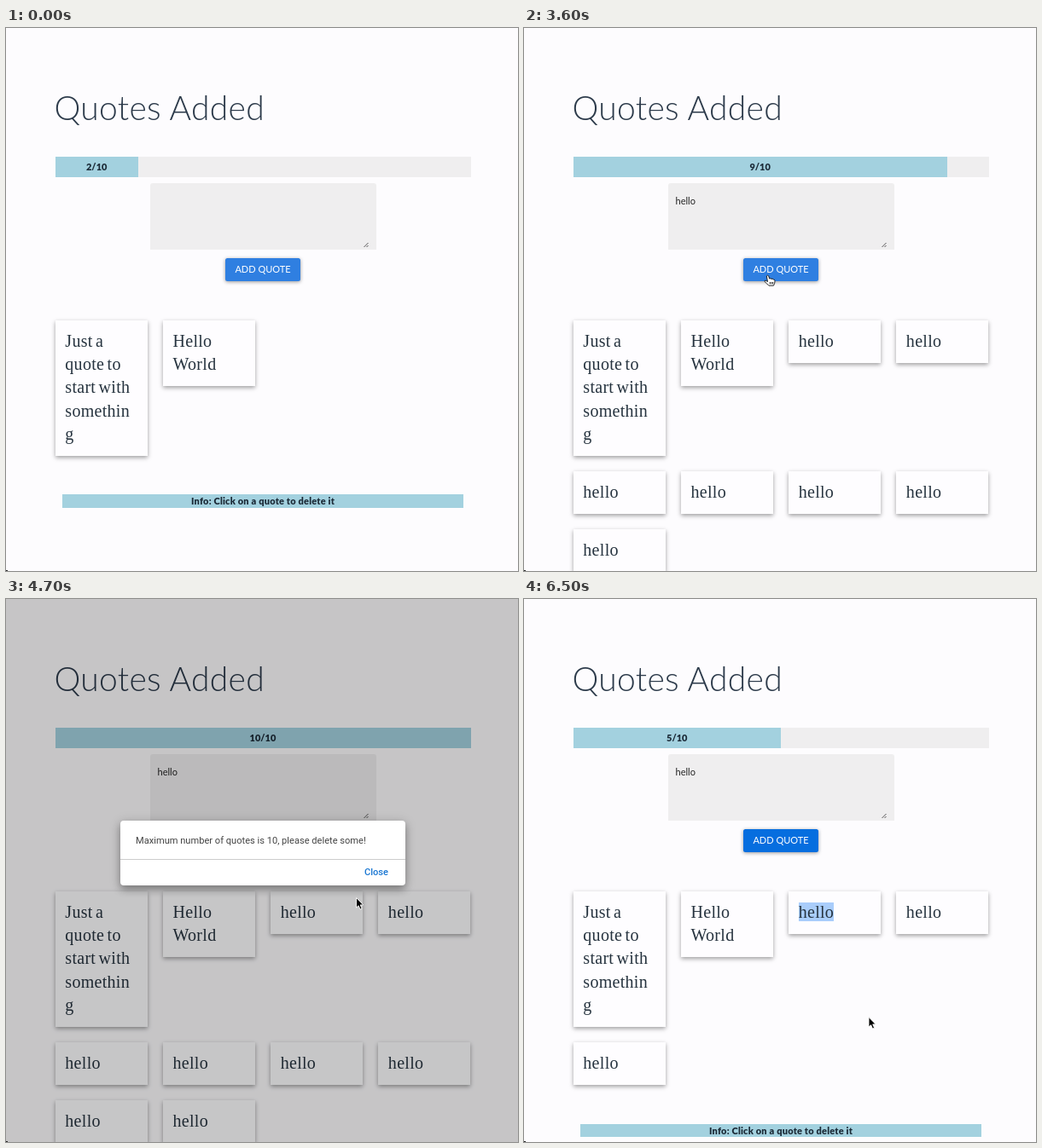
Recreate the animation shown at these times as an HTML page. Size 600 by 637 pixels, loop 6600 ms.

```html
<!DOCTYPE html>
<html lang="en">
<head>
<meta charset="utf-8">
<title>Quotes Added</title>
<style>
  html, body { margin: 0; width: 100%; height: 100%; overflow: hidden; }
  body { background: #fdfcfe; color: #2c3a4a; font: 11px/1.2 Lato, sans-serif; }
  #stage { position: relative; width: 600px; height: 637px; overflow: hidden; }
  #stage div, #stage svg { position: absolute; box-sizing: border-box; }
  h1 {
    position: absolute; left: 56.5px; top: 70px; margin: 0;
    font: 300 39px/46px Lato, sans-serif; letter-spacing: .3px; white-space: nowrap;
  }
  #track { left: 57.5px; top: 151px; width: 487px; height: 23.5px; background: #efeeef; }
  #bar, #info { background: #a3d1df; color: #1c2b38; font-weight: 900; text-align: center; }
  #bar { height: 100%; line-height: 23.5px; }
  #field {
    left: 168.5px; top: 182px; width: 265.5px; height: 77.5px; padding: 14px 9px;
    background: #efeeef; border-radius: 3px 3px 0 0; color: #222; line-height: 14px;
  }
  #field.focus { background: #cecdce; box-shadow: inset 0 -2px #1a78d6; }
  #grip { left: 419px; top: 251px; }
  #button {
    left: 257px; top: 269.5px; width: 88px; height: 27.5px; border-radius: 2.5px;
    line-height: 26px; text-align: center; color: #fff; box-shadow: 0 1px 4px rgba(0,0,0,.4);
  }
  #clip { inset: 0; overflow: hidden; border-radius: inherit; }
  #ripple { border-radius: 50%; background: #fff; opacity: .2; }
  #label { inset: 0; }
  #list { position: absolute; left: 57.8px; top: 342.8px; width: 486.6px; }
  #cards { display: grid; grid-template-columns: repeat(4, 108px); gap: 18.2px; align-items: start; }
  .card {
    padding: 11px 11.5px 11.7px; background: #fefdff; color: #26333f; white-space: pre;
    font: 20px/27.3px "Liberation Serif", serif; letter-spacing: .3px; word-spacing: -2px;
    box-shadow: 0 2px 5px rgba(0,0,0,.38);
  }
  .picked span { background: #a9cdfb; }
  #info { margin: 45.5px 8.2px 0; line-height: 15.6px; letter-spacing: .2px; }
  #shade { inset: 0; background: rgba(0,0,0,.44); }
  #dialog {
    left: 134px; top: 260px; width: 334px; height: 75.5px; background: #fff; border-radius: 4px;
    box-shadow: 0 5px 8px rgba(0,0,0,.28), 0 2px 14px rgba(0,0,0,.18);
    font: 11.1px/16px Roboto, sans-serif; color: #444;
  }
  #message { left: 18px; top: 16px; white-space: nowrap; }
  #foot { left: 0; top: 45px; width: 100%; height: 1px; background: #ccc; }
  #close { right: 20px; top: 53px; color: #1976d2; font-weight: 500; }
  #corner { left: 0; bottom: 0; width: 1.5px; height: 1.5px; background: #222; }
  #cursor { left: 0; top: 0; overflow: visible; }
</style>
</head>
<body>
<div id="stage">
  <h1>Quotes Added</h1>
  <div id="track"><div id="bar"></div></div>
  <div id="field"></div>
  <svg id="grip" width="7" height="7"><path d="M.5 6 5.5 1M3.5 6 5.5 4" stroke="#444" stroke-width=".9"/></svg>
  <div id="button"><div id="clip"><div id="ripple"></div></div><div id="label">ADD QUOTE</div></div>
  <main id="list">
    <section id="cards"></section>
    <p id="info">Info: Click on a quote to delete it</p>
  </main>
  <div id="shade"></div>
  <div id="dialog">
    <div id="message">Maximum number of quotes is 10, please delete some!</div>
    <div id="foot"></div>
    <div id="close">Close</div>
  </div>
  <svg id="cursor" width="14" height="18">
    <path id="arrow" d="M0 0V11.6L2.6 9.2 4.5 13.6 6.6 12.7 4.7 8.4H8.2Z" fill="#000" stroke="#fff" stroke-width=".9"/>
    <path id="hand" d="M-1.7 1Q-.6-.6.7.9L1.6 4.1Q3 3.2 4 4.4 5.4 3.7 6.2 5 7.8 4.8 8 6.6 8.2 9 6.5 12.2H.8Q-1 10-4 7.5-4.5 5.8-2.5 6.4L-.5 7.6ZM2.2 8V10.4M4 8V10.4M5.7 8V10.4" fill="#fff" stroke="#111" stroke-width=".9"/>
  </svg>
  <div id="corner"></div>
</div>
<script>
const $ = id => document.getElementById(id);
const show = (el, on) => el.style.display = on ? "" : "none";
const clamp = (v, lo, hi) => Math.min(hi, Math.max(lo, v));
const ease = p => p * p * (3 - 2 * p);

const LOOP = 6600, STEP = 100;
const TYPE = 1400, BLUR = 2100, OPEN = 4200, SHUT = 4800;
const ADD = 2200, ADD_EVERY = 220, PRESS_LEAD = 130;
const DELETE = 5000, DELETE_EVERY = 165;

// time, x, y of the pointer tip
const stops = [
  [100, 318, 278], [400, 180, 95], [700, 78, 355], [1000, 130, 97],
  [1200, 218, 208.5], [TYPE, 218, 208.5], [1700, 342, 543], [2000, 286, 290],
  [OPEN, 286, 290], [4600, 429, 320], [SHUT, 392, 381], [DELETE, 356, 374],
  [5700, 356, 374], [6100, 404, 490.5]
];

// events so far in a regular series
const tally = (t, start, every, max) => clamp(Math.floor((t - start) / every) + 1, 0, max);

function pointerAt(t) {
  const i = stops.findIndex(s => s[0] > t);
  if (i < 0) return stops[stops.length - 1].slice(1);
  if (i === 0) return stops[0].slice(1);
  const [t0, x0, y0] = stops[i - 1], [t1, x1, y1] = stops[i];
  const p = ease((t - t0) / (t1 - t0));
  return [x0 + (x1 - x0) * p, y0 + (y1 - y0) * p];
}

const texts = ["Just a\nquote to\nstart with\nsomethin\ng", "Hello\nWorld"];
const cards = Array.from({ length: 10 }, (_, i) => {
  const card = document.createElement("article"), span = document.createElement("span");
  card.className = "card";
  span.textContent = texts[i] || "hello";
  card.append(span);
  $("cards").append(card);
  return card;
});

function drawButton(t, hover) {
  const heat = hover ? 1 : t < SHUT ? 0 : clamp((SHUT + STEP - t) / 200, 0, 1);
  $("button").style.background = `color-mix(in srgb, #2f7fe1 ${heat * 100}%, #066edf)`;

  const pressed = t - ADD + PRESS_LEAD;
  const age = pressed % ADD_EVERY;
  const r = 16 + age * .28, x = 29 + age * .12;
  show($("ripple"), pressed >= 0 && t < OPEN && age < 200);
  Object.assign($("ripple").style, {
    left: x - r + "px", top: 14 - r + "px", width: 2 * r + "px", height: 2 * r + "px"
  });
}

function draw(t) {
  const count = 2 + tally(t, ADD, ADD_EVERY, 8) - tally(t, DELETE, DELETE_EVERY, 5);
  $("bar").style.width = count * 10 + "%";
  $("bar").textContent = count + "/10";
  cards.forEach((card, i) => show(card, i < count));
  cards[2].classList.toggle("picked", t >= DELETE + DELETE_EVERY);

  $("field").className = t >= 1200 && t < BLUR ? "focus" : "";
  $("field").textContent = "hello".slice(0, tally(t, TYPE, STEP, 5));

  const open = t >= OPEN && t < SHUT;
  const [x, y] = pointerAt(t);
  const over = (left, right, top, bottom) => x > left && x < right && y > top && y < bottom;
  const onButton = !open && over(257, 345, 269, 297);
  const onClose = open && over(418, 452, 310, 332);
  drawButton(t, onButton || open);

  show($("shade"), open);
  show($("dialog"), open);
  $("shade").style.opacity = clamp(Math.min(t - OPEN + STEP, SHUT - t) / 200, 0, 1);

  show($("cursor"), t >= 100 && (t < TYPE || t >= 1700));
  $("cursor").style.transform = `translate(${x}px, ${y}px)`;
  show($("hand"), onButton || onClose);
  show($("arrow"), !onButton && !onClose);
}

const begin = performance.now();
function tick() {
  const t = (performance.now() - begin) % LOOP;
  draw(Math.floor(t / STEP) * STEP);
  requestAnimationFrame(tick);
}
draw(0);
requestAnimationFrame(tick);
</script>
</body>
</html>
```
